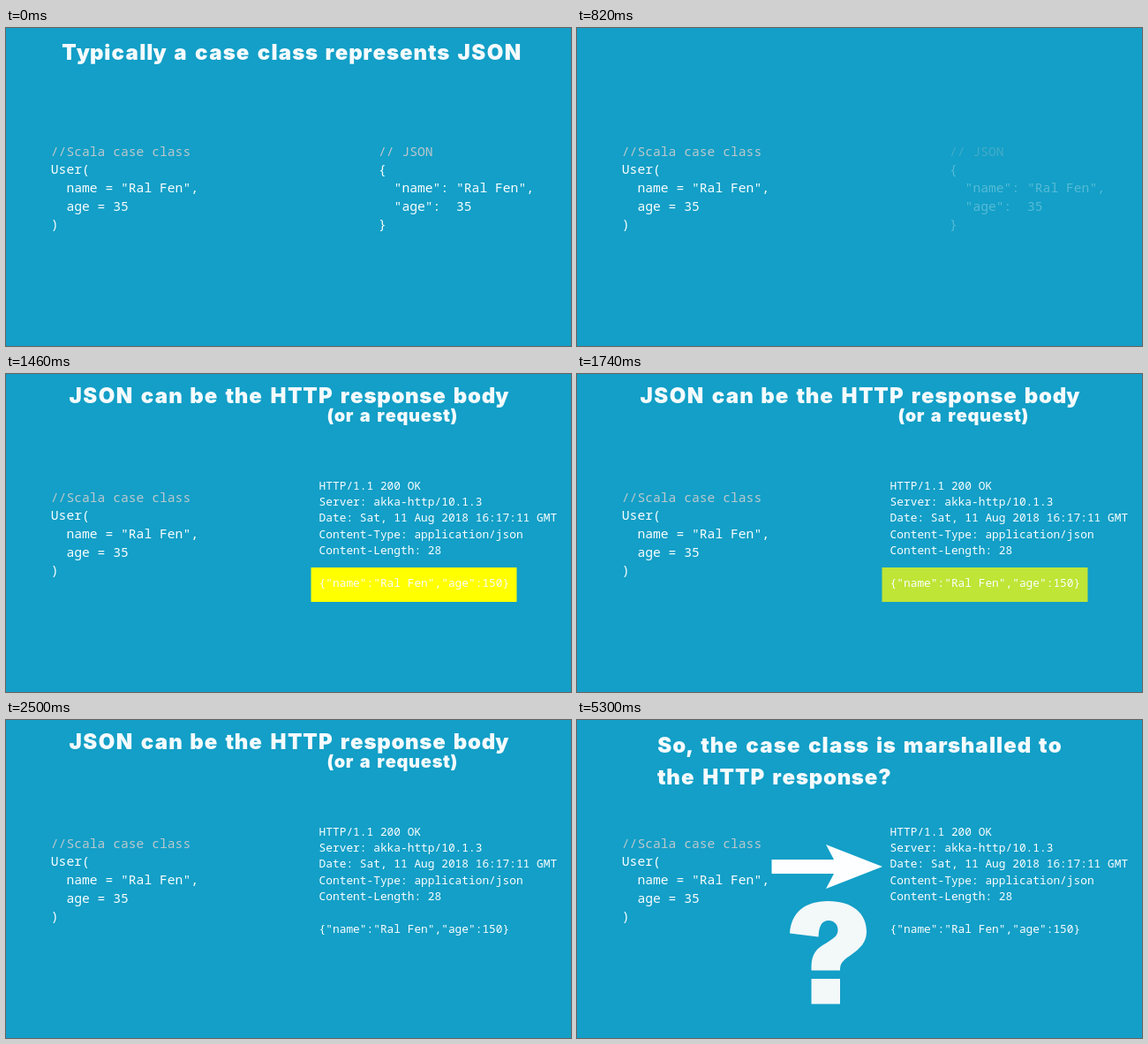
Write an HTML page with a canvas that moves like this. It is 640 px wide and 360 px high and loops after 8000 ms.

```html
<!DOCTYPE html>
<html lang="en">
<head>
<meta charset="utf-8">
<title>Case class and JSON</title>
<style>
html, body { margin: 0; width: 100%; height: 100%; overflow: hidden; background: #139fc7; }
canvas { display: block; width: 640px; height: 360px; }
</style>
</head>
<body>
<canvas id="stage" width="640" height="360"></canvas>
<script>
const ctx = document.getElementById('stage').getContext('2d');
const LOOP = 8000, STEP = 40, OFFSET = 20;
const BG = '#139fc7', WHITE = '#fbfeff', TITLE = '#f5fbfd', GREY = '#bcc8cd';

// Heading advances in thousandths of an em; other letters take 667.
const ADVANCES = { 333: ' il,', 389: '()', 444: 'rt', 611: 'sy?', 722: 'TSP', 833: 'ONH', 1000: 'm' };
const headAdvance = {};
for (const [w, chars] of Object.entries(ADVANCES))
  for (const c of chars) headAdvance[c] = w / 1000;

// Sets each glyph in the middle of its own cell.
function setLine(text, x, y, cell) {
  for (const c of text) {
    const w = cell(c);
    if (c !== ' ') ctx.fillText(c, x + w / 2, y);
    x += w;
  }
}

function heading(text, x, y, size = 24) {
  ctx.font = `900 ${size}px Inter, "Noto Sans", sans-serif`;
  ctx.fillStyle = TITLE;
  setLine(text, x, y, c => (headAdvance[c] || 0.667) * size);
}

function code(lines, x, y, advance, leading) {
  ctx.font = `${advance / 0.6}px "Noto Sans Mono", "DejaVu Sans Mono", monospace`;
  lines.forEach((line, i) => {
    ctx.fillStyle = line.startsWith('//') ? GREY : WHITE;
    setLine(line, x, Math.round(y + i * leading), () => advance);
  });
}

const scala = ['//Scala case class', 'User(', '  name = "Ral Fen",', '  age = 35', ')'];
const json = ['// JSON', '{', '  "name": "Ral Fen",', '  "age":  35', '}'];
const http = [
  'HTTP/1.1 200 OK',
  'Server: akka-http/10.1.3',
  'Date: Sat, 11 Aug 2018 16:17:11 GMT',
  'Content-Type: application/json',
  'Content-Length: 28',
  '',
  '{"name":"Ral Fen","age":150}'
];

function arrow() {
  ctx.fillStyle = '#fdfeff';
  ctx.beginPath();
  ctx.moveTo(220.5, 158);
  ctx.lineTo(291, 158);
  ctx.lineTo(282, 141);
  ctx.lineTo(346, 166);
  ctx.lineTo(282, 191);
  ctx.lineTo(291, 174);
  ctx.lineTo(220.5, 174);
  ctx.fill();
}

function questionMark() {
  ctx.fillStyle = '#f3f8f9';
  ctx.beginPath();
  ctx.moveTo(273.5, 245.5);
  ctx.lineTo(241, 241.5);
  ctx.bezierCurveTo(242.5, 219, 257, 205, 284.5, 205);
  ctx.bezierCurveTo(312, 205, 328, 219, 328, 239.5);
  ctx.bezierCurveTo(328, 251, 321.5, 258.5, 309, 267);
  ctx.bezierCurveTo(300, 273, 298, 276, 298, 283.5);
  ctx.lineTo(265.5, 283.5);
  ctx.bezierCurveTo(265, 268, 268.5, 261, 279, 254.5);
  ctx.bezierCurveTo(291.5, 247, 295.5, 244, 295.5, 238);
  ctx.bezierCurveTo(295.5, 231, 291, 227, 285, 227);
  ctx.bezierCurveTo(277.5, 227, 274, 233, 273.5, 245.5);
  ctx.fill();
  ctx.fillRect(265.5, 293, 32.5, 28.5);
}

const fade = (t, start, length) => Math.max(0, Math.min(1, 1 - (t - start) / length));

function draw(t) {
  ctx.globalAlpha = 1;
  ctx.fillStyle = BG;
  ctx.fillRect(0, 0, 640, 360);
  ctx.textAlign = 'center';

  code(scala, 50.8, 144.6, 8.8, 20.7);

  if (t < 980) {
    ctx.globalAlpha = fade(t, 480, 480);
    code(json, 422, 144.6, 8.8, 20.7);
    ctx.globalAlpha = 1;
  } else {
    if (t >= 1460 && t < 2500) {
      ctx.globalAlpha = fade(t, 1460, 1040);
      ctx.fillStyle = '#ffff00';
      ctx.fillRect(345.5, 219, 233, 39);
      ctx.globalAlpha = 1;
    }
    code(http, 354.6, 130.6, 7.7, 18.4);
  }

  if (t < 500) {
    heading('Typically a case class represents JSON', 62.7, 36);
  } else if (t >= 1460 && t < 4340) {
    heading('JSON can be the HTTP response body', 70.6, 33);
    heading('(or a request)', 363.5, 54, 20);
  } else if (t >= 5300) {
    heading('So, the case class is marshalled to', 90.5, 37);
    heading('the HTTP response?', 90.5, 73);
    arrow();
    questionMark();
  }
}

const origin = performance.now();
function tick() {
  const t = (performance.now() - origin) % LOOP;
  draw(Math.max(0, Math.floor((t - OFFSET) / STEP) * STEP + OFFSET));
  requestAnimationFrame(tick);
}
tick();
</script>
</body>
</html>
```
